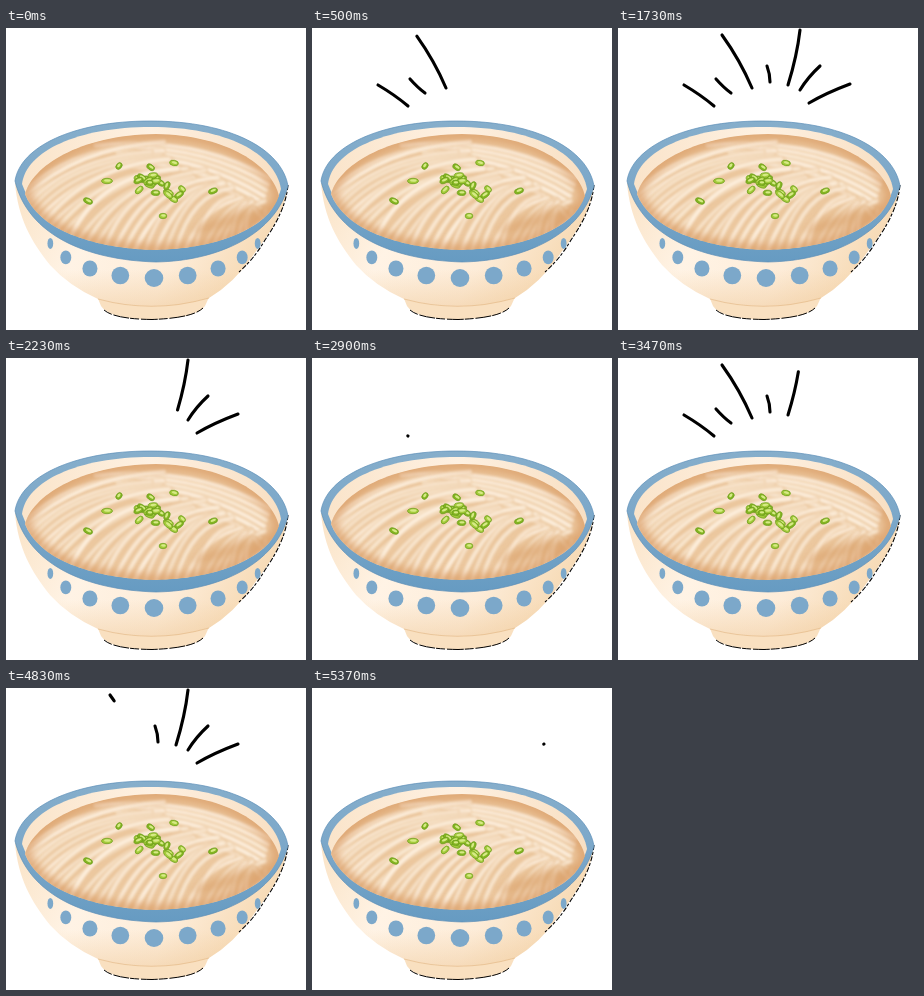
Recreate the animation shown at these times as an HTML page. Size 300x302 px, loop 5.41 s.

```html
<!DOCTYPE html>
<html lang="en">
<head>
<meta charset="utf-8">
<title>Noodle bowl</title>
<style>
  html, body { margin: 0; width: 100%; height: 100%; overflow: hidden; background: #fff; }
  svg { display: block; width: 100vw; height: 100vh; }
</style>
</head>
<body>
<svg viewBox="0 0 300 302" preserveAspectRatio="none">
  <defs>
    <linearGradient id="body" x1="0" x2="1" y1="0" y2=".25">
      <stop offset="0" stop-color="#fae3c6"/>
      <stop offset=".35" stop-color="#fff3e5"/>
      <stop offset=".7" stop-color="#fdecd8"/>
      <stop offset="1" stop-color="#f6d9b3"/>
    </linearGradient>
    <linearGradient id="shade" x1="0" x2="0" y1="0" y2="1">
      <stop offset=".7" stop-color="#eec797" stop-opacity="0"/>
      <stop offset="1" stop-color="#eec797" stop-opacity=".45"/>
    </linearGradient>
    <linearGradient id="rim" x1="0" x2="0" y1="0" y2="1">
      <stop offset="0" stop-color="#86aecb"/>
      <stop offset=".5" stop-color="#7ba7c9"/>
      <stop offset="1" stop-color="#669bc2"/>
    </linearGradient>
    <linearGradient id="wall" x1="0" x2="1" y1="0" y2="0">
      <stop offset="0" stop-color="#fae4ca"/>
      <stop offset=".5" stop-color="#fef1e2"/>
      <stop offset="1" stop-color="#f8dfc2"/>
    </linearGradient>
    <path id="hull" d="M9 155C12 190 25 213 44 237Q63 258 92 271Q147 287 203 270Q228 255 246 229C262 207 279 185 282 158Z"/>
    <path id="surface" d="M19 166C26 139 72 107 150 106C222 107 266 138 273 168C262 201 210 221 148 222C82 220 32 200 19 166Z"/>
    <clipPath id="pool"><use href="#surface"/></clipPath>
    <filter id="soft"><feGaussianBlur stdDeviation=".8"/></filter>
    <filter id="wash" x="-30%" y="-30%" width="160%" height="160%"><feGaussianBlur stdDeviation="4"/></filter>
  </defs>

  <path d="M91 268L95 278Q103 291 146 291.500Q191 290 199 278L204 267Z" fill="#f9e0c0"/>
  <path d="M98 282Q108 291 146 291.500Q187 290 197 280" fill="none" stroke="#000" stroke-width="1" stroke-dasharray="9 2 16 1"/>
  <use href="#hull" fill="url(#body)"/>
  <use href="#hull" fill="url(#shade)"/>
  <path d="M92 271Q147 286 203 270" fill="none" stroke="#e5bd8c" stroke-width="1.2" opacity=".7"/>
  <path d="M282 157C280 178 270 196 259 212Q248 231 233 244" fill="none" stroke="#000" stroke-width="1.100" stroke-dasharray="5 2 3 1.5"/>
  <g id="dots" fill="#7ca8ca"></g>

  <path d="M9 153C14 119 67 93 144 93C226 93 276 122 282 158C270 205 214 233 150 234C80 232 22 207 9 153Z" fill="url(#rim)" stroke="#5c8fb8" stroke-width=".7"/>
  <path d="M16 156C20 123 72 99 145 99C220 99 269 125 275 161C264 199 210 220 149 221C82 219 30 197 16 156Z" fill="url(#wall)"/>
  <g clip-path="url(#pool)">
    <use href="#surface" fill="#ecc89f"/>
    <g id="noodles" fill="none" stroke-linecap="round" filter="url(#soft)"></g>
    <g filter="url(#wash)">
      <use href="#surface" fill="none" stroke="#d89a62" stroke-width="11" opacity=".75"/>
      <ellipse cx="226" cy="192" rx="42" ry="7" transform="rotate(-17 226 192)" fill="#dba069" opacity=".7"/>
    </g>
  </g>
  <g id="scallions"></g>
  <g id="rays" fill="none" stroke="#000" stroke-width="3.100" stroke-linecap="round"></g>
</svg>
<script>
const LOOP = 5410;

function add(parent, tag, attrs) {
  const node = document.createElementNS('http://www.w3.org/2000/svg', tag);
  for (const key in attrs) node.setAttribute(key, attrs[key]);
  return document.getElementById(parent).appendChild(node);
}

let seed = 17;
function random() {
  seed = (seed * 16807) % 2147483647;
  return seed / 2147483647;
}
const spread = size => (random() + random() - 1) * size;
const mix = (a, b, k) => a + (b - a) * k;

// Evenly spaced dots around the curved wall of the bowl.
for (let i = -4; i <= 4; i++) {
  const angle = i * Math.PI / 10;
  const facing = Math.cos(angle);
  add('dots', 'ellipse', {
    cx: 148 + 109 * Math.sin(angle), cy: 200 + 50 * facing,
    rx: 9.3 * facing, ry: 4 + 5 * facing,
  });
}

function strand(x0, y0, cx, cy, x1, y1) {
  const d = `M${x0} ${y0}Q${cx} ${cy} ${x1} ${y1}`;
  const opacity = 0.5 + random() * 0.4;
  add('noodles', 'path', { d, stroke: '#dfae7b', 'stroke-width': 7, opacity: 0.4 });
  add('noodles', 'path', { d, stroke: '#fbe9d2', 'stroke-width': 5.5, opacity });
  add('noodles', 'path', { d, stroke: '#fff5e8', 'stroke-width': 1.5, opacity });
}

// Strands across the top right, then a sweep from the near edge up to the right.
for (let i = 0; i < 6; i++) {
  strand(105 + spread(20), 117 + 4 * i, 190, 108 + 6 * i, 264 - 2 * i, 150 + 6 * i);
}
const STRANDS = 34;
for (let i = 0; i < STRANDS; i++) {
  const k = i / (STRANDS - 1);
  const angle = mix(Math.PI, 0.5, k);
  const x0 = 146 + 128 * Math.cos(angle);
  const x1 = mix(145, 258, k) + spread(18);
  const y1 = mix(118, 188, k) + spread(8);
  strand(x0, 164 + 58 * Math.sin(angle), mix(x0, x1, 0.35) + spread(10), y1 + 6, x1, y1);
}

function scallion(x, y, i) {
  const transform = `translate(${x} ${y}) rotate(${spread(70)})`;
  const rx = 3.5 + random() * 2;
  add('scallions', 'ellipse', { transform, rx, ry: 2.7, fill: i % 2 ? '#83b521' : '#a3cb3a', stroke: '#6c9c1c', 'stroke-width': 0.7 });
  add('scallions', 'ellipse', { transform, cx: 0.4, cy: -0.5, rx: rx * 0.6, ry: 1.2, fill: '#d6ea86' });
}
[[168, 135], [113, 138], [101, 153], [82, 173], [157, 188], [207, 163], [176, 161], [173, 167]]
  .forEach(([x, y], i) => scallion(x, y, i));
for (let i = 0; i < 20; i++) {
  const x = 145 + spread(25);
  scallion(x, 153 + (x - 145) * 0.2 + spread(15), i);
}

// Each ray runs outwards from the bowl and starts as the one before it ends.
let clock = 0;
const rays = [
  ['M96 78Q83 67 66 57', 145],
  ['M113 65Q106 60 98 51', 80],
  ['M134 60Q122 32 104 7', 211],
  ['M152 54Q152 46 149 38', 22],
  ['M170 57Q179 28 182 2', 144],
  ['M182 62Q190 49 202 38', 178],
  ['M191 75Q208 65 232 56', 172],
].map(([d, duration]) => {
  const start = clock;
  clock += duration;
  return { start, duration, node: add('rays', 'path', { d, pathLength: 1 }) };
});

const sweeps = [
  { until: 2880, draw: 70, erase: 1760 },
  { until: LOOP, draw: 2900, erase: 4420 },
];

function render(time) {
  const { draw, erase } = sweeps.find(sweep => time < sweep.until);
  for (const { node, start, duration } of rays) {
    const progress = since => Math.min(1, Math.max(0, (time - since - start) / duration));
    const tail = progress(erase);
    const length = progress(draw) - tail;
    node.setAttribute('visibility', length > 0 ? 'visible' : 'hidden');
    node.setAttribute('stroke-dasharray', `${length} 3`);
    node.setAttribute('stroke-dashoffset', -tail);
  }
}

const began = performance.now();
function tick() {
  render((performance.now() - began) % LOOP);
  requestAnimationFrame(tick);
}
tick();
</script>
</body>
</html>
```
